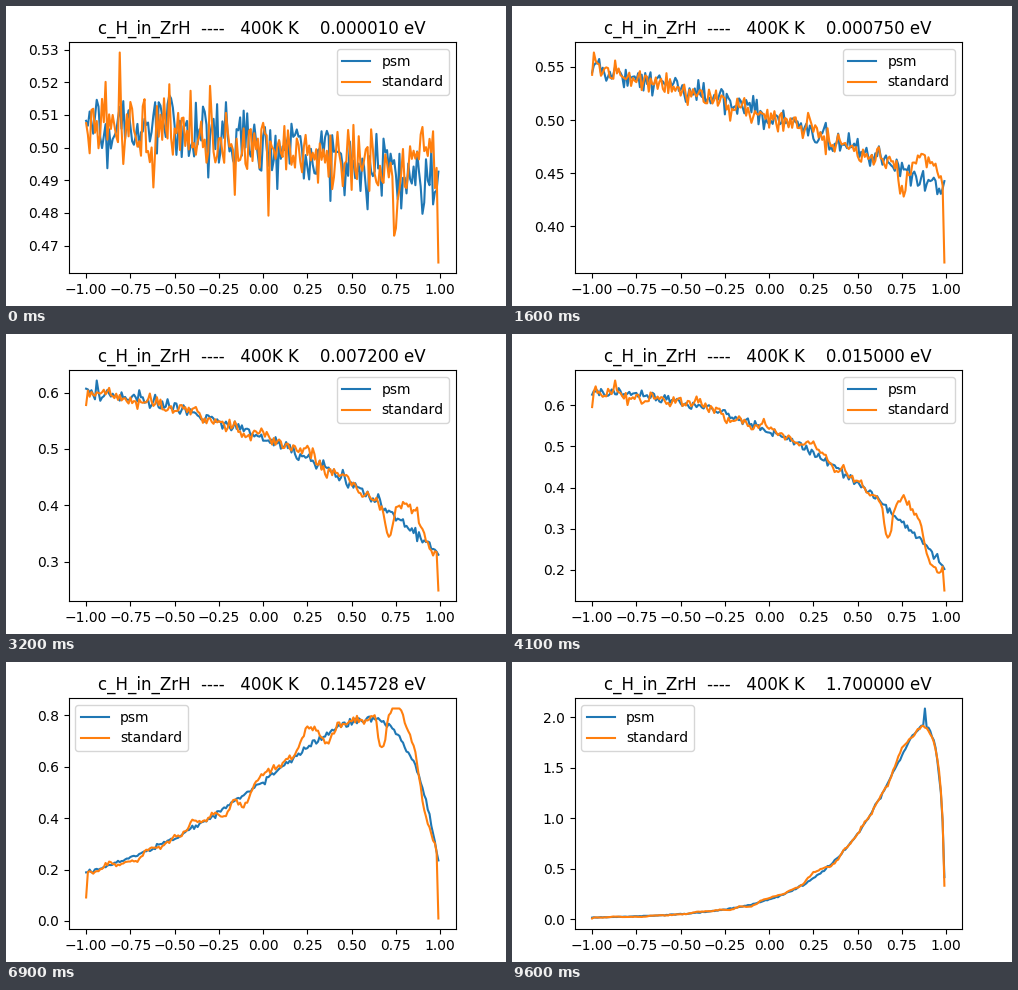
Write a matplotlib script that moves like this. It is 500 px wide and 300 px high and loops after 9700 ms.

```python
import numpy as np
import matplotlib.pyplot as plt
from matplotlib.animation import FuncAnimation

plt.rcParams["text.kerning_factor"] = 6

# Incident energies in eV shown in the title, one per frame
ENERGIES = [
    1e-5, 1.78e-5, 2.5e-5, 3.5e-5, 5e-5, 7e-5, 1e-4, 1.26e-4, 1.6e-4, 2e-4,
    .000253, .000297, .00035, .00042, .000506, .000615, .00075, .00087,
    .001012, .00123, .0015, .0018, .00203, .002277, .0026, .003, .0035,
    .004048, .0045, .005, .0056, .006325, .0072, .0081, .009108, .01, .01063,
    .0115, .012397, .0133, .01417, .015, .016192, .0182, .0199, .020493,
    .0215, .0228, .0253, .028, .030613, .0338, .0365, .0395, .042757, .0465,
    .05, .056925, .0625, .069, .075, .081972, .09, .096, .1035, .111573, .12,
    .128, .1355, .145728, .16, .172, .184437, .2, .2277, .2510392, .2705304,
    .2907501, .3011332, .3206421, .3576813, .39, .4170351, .45, .5032575, .56,
    .625, .7, .78, .86, .95, 1.05, 1.16, 1.28, 1.42, 1.55, 1.7]

MU = np.linspace(-1, 0.99, 200)
NOISE = 0.008

# Key values of each parameter at these frames, linear in between
TIMES = [0, 8, 24, 41, 57, 81, 96]
KEYS = dict(
    cut=[.1, .125, .385, .752, .948, .99, 1.008],   # fall towards mu = 1
    power=[1, 1, 1, 1, 1, .7, .5],
    slope=[.082, .077, .21, .4, .895, 2.65, 3.4],
    bend=[0, 0, 0, 0, 0, .25, .5],
    top=[.5291, .5378, .587, .66, .619, 1.307, 2.085],
    start=[1, 1, .98, .94, .83, .15, .35],          # first point, relative
    end=[.4648, .3947, .337, .15, .012, .007, .33],  # last point
    step=[.014, .02, .028, .065, .17, .03, 0],
    ripple=[0, 0, .004, .01, .01, .045, .025],
)


def at(name, n):
    return np.interp(n, TIMES, KEYS[name])


def angular(n):
    """Smooth scattering density over MU, normalised to one."""
    p = ((1 - at("cut", n) * MU) ** at("power", n)
         * np.exp(at("slope", n) * MU + at("bend", n) * MU ** 2))
    return p / (p.sum() * 0.01)


def plateau(centre, width):
    return np.exp(-((MU - centre) / width) ** 4)


def steps(n):
    """Dip, shelf and trough of the standard line near forward angles."""
    late = np.clip((n - 24) / 17, 0, 1)
    return at("step", n) * (0.8 * plateau(0.89 - 0.09 * late, 0.08)
                            - plateau(0.75 - 0.08 * late, 0.025)
                            - 0.45 * plateau(0.93, 0.05) * late)


def smooth_noise(seed, width=15):
    wave = np.random.default_rng(seed).standard_normal(MU.size)
    wave = np.convolve(wave, np.hanning(width), mode="same")
    return wave / wave.std()


WAVE = smooth_noise(4)
LIFT = [top / angular(t).max() for t, top in zip(TIMES, KEYS["top"])]


def sample(n):
    """Noisy psm and standard lines for frame n."""
    rng = np.random.default_rng(n)
    psm = angular(n)
    first, last = psm[0] * at("start", n), at("end", n)
    floor = min(first, last)
    top = psm.max() * np.interp(n, TIMES, LIFT)
    standard = psm + steps(n) + at("ripple", n) * np.sqrt(psm) * WAVE

    lines = np.maximum([psm, standard], floor)
    lines += NOISE * np.sqrt(lines) * rng.standard_normal(lines.shape)
    lines[1, 0], lines[1, -1] = first, last
    lines = np.clip(lines, floor, top)
    lines.flat[lines.argmax()] = top
    return lines


fig, ax = plt.subplots(figsize=(5, 3), dpi=100)


def draw(n):
    ax.clear()
    for line, label in zip(sample(n), ("psm", "standard")):
        ax.plot(MU, line, label=label)
    ax.set_title(f"c_H_in_ZrH  ----   400K K    {ENERGIES[n]:f} eV")
    ax.legend(loc="best")


anim = FuncAnimation(fig, draw, frames=len(ENERGIES), interval=100, repeat=True)
plt.show()
```
